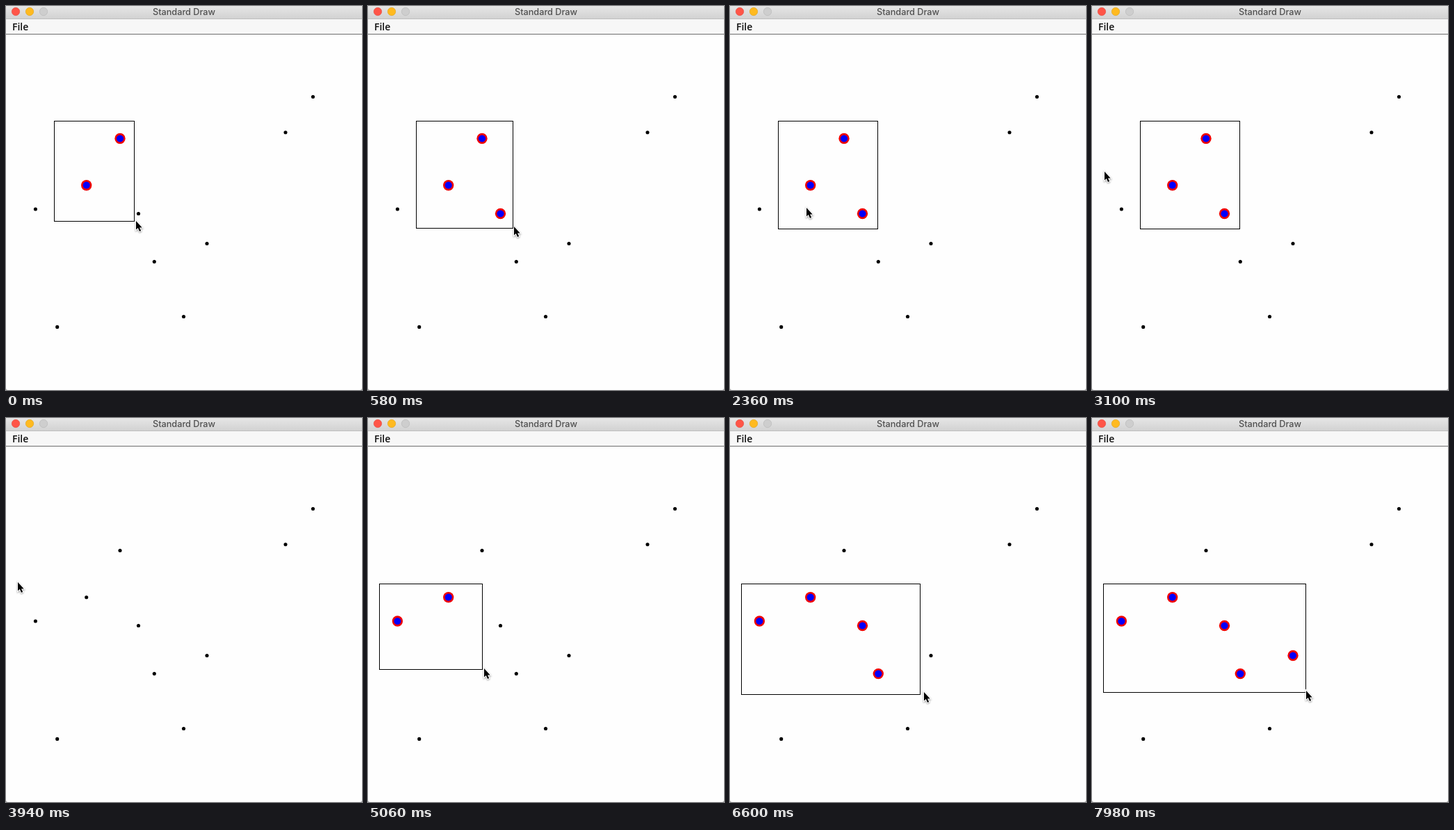
Animation of 512 by 552 pixels, one loop 8 s. Source, as an HTML page:

```html
<!DOCTYPE html>
<html lang="en">
<head>
<meta charset="utf-8">
<title>Standard Draw</title>
<style>
  html, body { margin: 0; width: 100%; height: 100%; overflow: hidden; background: #a8a8a8; }
  svg { display: block; width: 512px; height: 552px; }
  .title { font: 500 12.7px Inter, "Liberation Sans", sans-serif; fill: #505050; text-anchor: middle; }
  .menu { font: 600 14px "Open Sans", "Noto Sans", sans-serif; fill: #111; }
  .ring { fill: none; r: 7.68px; }
  .core { r: 2.56px; }
  .hit .ring { fill: #ee0000; }
  .hit .core { fill: #00f; r: 5.12px; }
  #cursor { filter: drop-shadow(0 1px 1px #0006); }
</style>
</head>
<body>
<svg viewBox="0 0 512 552">
  <defs>
    <linearGradient id="bar" x2="0" y2="1">
      <stop stop-color="#e6e6e6"/>
      <stop offset="1" stop-color="#d2d2d2"/>
    </linearGradient>
  </defs>
  <path d="M0 0H512V549Q512 552 509 552H3Q0 552 0 549Z" fill="#fefefe"/>
  <rect width="512" height="18" fill="url(#bar)"/>
  <rect y="18" width="512" height="1" fill="#bebebe"/>
  <rect y="19" width="512" height="21" fill="#f7f7f7"/>
  <rect y="40" width="512" height="1" fill="#6e6e6e"/>
  <g stroke-width=".6">
    <circle cx="14" cy="8" r="5.7" fill="#ff5548" stroke="#e2463a"/>
    <circle cx="34" cy="8" r="5.7" fill="#ffba20" stroke="#dfa010"/>
    <circle cx="54" cy="8" r="5.7" fill="#cecece" stroke="#b6b6b6"/>
  </g>
  <text class="title" x="256" y="13">Standard Draw</text>
  <text class="menu" x="9" y="35">File</text>
  <rect id="box" fill="none" stroke="#000"/>
  <g id="dots"></g>
  <path id="cursor" d="M0 0V12.6L2.8 10 5 15 7.2 14 5 9.4H8.7Z"
    stroke="#fff" stroke-width="2" paint-order="stroke"/>
</svg>
<script>
const LOOP = 8000, LAG = 50;
const RELEASE = 1400, CLEAR = 3800, PRESS = 4100;

const points = [
  [441.5, 130.5], [402, 181.7], [164, 190.5], [115.7, 257.7], [42.4, 292],
  [190.5, 298.5], [289, 341.5], [213.3, 367.6], [255.5, 446.5], [73.7, 461.4]
];

// Key points of the pointer: time, x, y
const path = [
  [-100, 182, 303], [0, 187, 309], [800, 213, 318], [1500, 213, 318],
  [2360, 110, 290], [3200, 16, 236], [4100, 17, 236], [4900, 160, 357],
  [5060, 167, 360], [6300, 245, 398], [6600, 279, 394], [7000, 308, 392]
];
const last = path.length - 1;

const slope = (i, k) => (path[i + 1][k] - path[i][k]) / (path[i + 1][0] - path[i][0]);

function tangent(i, k) {
  if (i === 0) return slope(0, k);
  if (i === last) return 0;
  const a = slope(i - 1, k), b = slope(i, k);
  return a * b <= 0 ? 0 : 2 * a * b / (a + b);
}

// Monotone cubic through the key points
function pointer(t) {
  let i = 0;
  while (i < last - 1 && path[i + 1][0] <= t) i++;
  const a = path[i], b = path[i + 1], d = b[0] - a[0];
  const u = Math.min(1, (t - a[0]) / d);
  return [1, 2].map(k =>
    a[k] + (b[k] - a[k]) * u * u * (3 - 2 * u)
      + d * u * (1 - u) * ((1 - u) * tangent(i, k) - u * tangent(i + 1, k)));
}

// The box trails the pointer while the button is down
function selection(t) {
  if (t >= CLEAR && t < PRESS + LAG) return null;
  const first = t < CLEAR;
  const [x, y] = first ? [69.5, 165.5] : [16.5, 238.5];
  const [px, py] = pointer(first ? Math.min(t - LAG, RELEASE) : t - LAG);
  return {
    x, y,
    width: Math.max(0, Math.round(px - 0.5 - x)),
    height: Math.max(0, Math.round(py + 2.5 - y))
  };
}

const contains = (s, [x, y]) =>
  x >= s.x && x <= s.x + s.width && y >= s.y && y <= s.y + s.height;

const $ = id => document.getElementById(id);
const set = (el, attrs) => {
  for (const k in attrs) el.setAttribute(k, attrs[k]);
  return el;
};
const make = (tag, attrs, parent) =>
  parent.appendChild(set(document.createElementNS("http://www.w3.org/2000/svg", tag), attrs));

const dots = points.map(([cx, cy]) => {
  const g = make("g", {}, $("dots"));
  for (const name of ["ring", "core"]) make("circle", { class: name, cx, cy }, g);
  return g;
});

function draw(t) {
  const s = selection(t);
  set($("box"), s || { width: 0, height: 0 });
  points.forEach((p, i) => dots[i].classList.toggle("hit", !!s && contains(s, p)));
  const [x, y] = pointer(t).map(Math.round);
  set($("cursor"), { transform: `translate(${x} ${y})` });
}

const start = performance.now();
function tick() {
  draw((performance.now() - start) % LOOP);
  requestAnimationFrame(tick);
}
tick();
</script>
</body>
</html>
```
